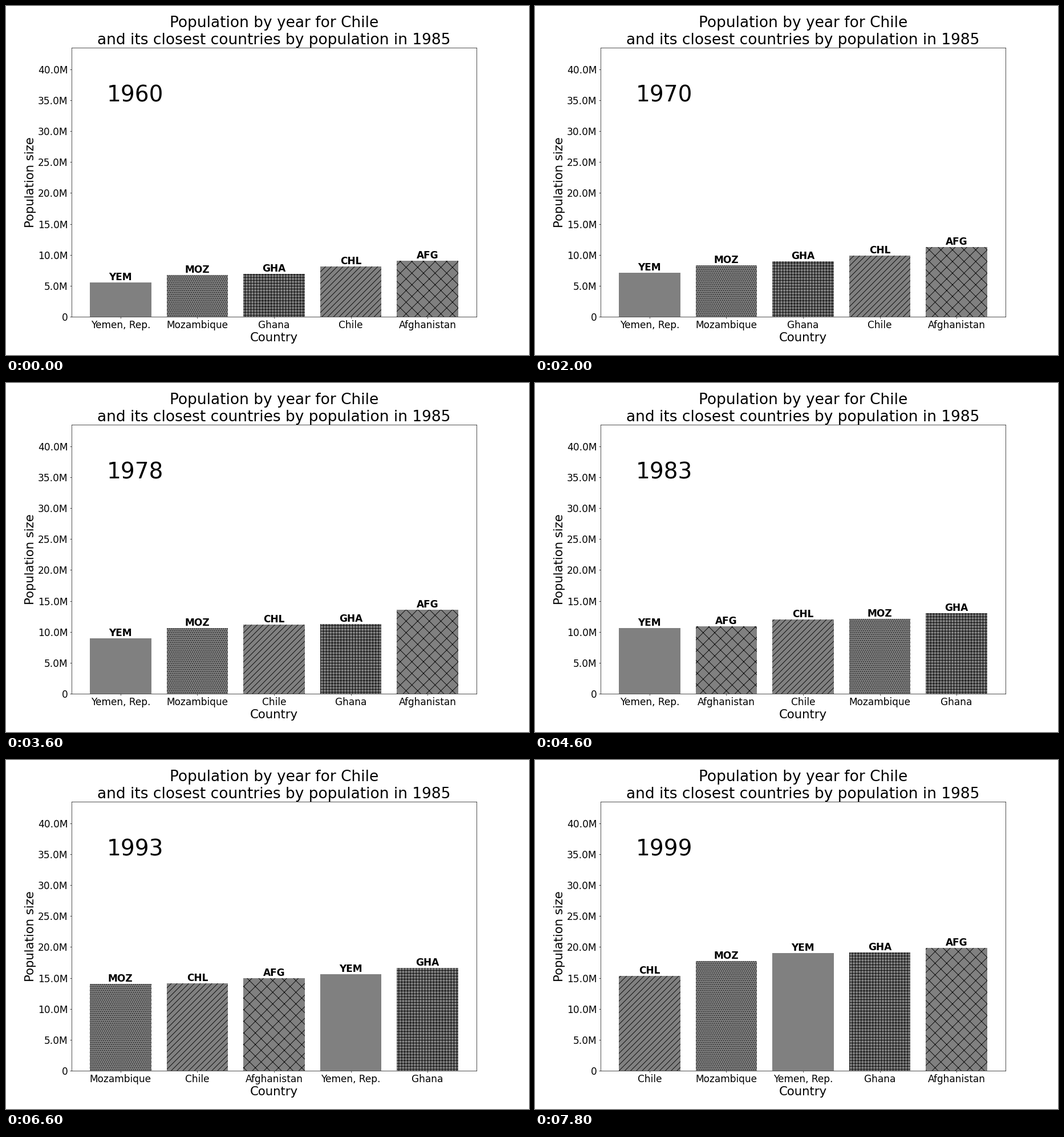
Animation, 917 px wide and 611 px high, one loop 8000 ms. Source, as a matplotlib script:

```python
import numpy as np
import matplotlib.pyplot as plt
from matplotlib.animation import FuncAnimation
from matplotlib.ticker import FuncFormatter, MultipleLocator

WIDTH, HEIGHT = 917, 611
DPI = WIDTH / 15
START, END = 1960, 1999
YEARS = np.arange(START, END + 1)


def smooth(points):
    """Cubic Hermite curve through {year: millions}, sampled every year."""
    x = np.array(list(points), float)
    y = np.array(list(points.values()), float)
    slope = np.gradient(y, x)
    i = np.clip(np.searchsorted(x, YEARS, side="right") - 1, 0, len(x) - 2)
    h = x[i + 1] - x[i]
    t = (YEARS - x[i]) / h
    return ((1 + 2 * t) * (1 - t) ** 2 * y[i]
            + t * (1 - t) ** 2 * h * slope[i]
            + t ** 2 * (3 - 2 * t) * y[i + 1]
            + t ** 2 * (t - 1) * h * slope[i + 1])


# code: (name, hatch, population in millions)
COUNTRIES = {
    "YEM": ("Yemen, Rep.", None, smooth({
        1960: 5.54, 1966: 6.37, 1973: 7.67, 1978: 8.92, 1983: 10.62,
        1988: 12.82, 1993: 15.57, 1999: 19.03})),
    "MOZ": ("Mozambique", "...", smooth({
        1960: 6.75, 1966: 7.57, 1973: 8.98, 1978: 10.62, 1983: 12.06,
        1985: 12.5, 1988: 12.8, 1990: 13.1, 1992: 13.55, 1993: 14.05,
        1994: 14.9, 1996: 16.2, 1999: 17.74})),
    "GHA": ("Ghana", "++", smooth({
        1960: 6.93, 1966: 8.06, 1973: 9.7, 1978: 11.23, 1983: 13.04,
        1988: 14.83, 1993: 16.62, 1999: 19.14})),
    "CHL": ("Chile", "//", smooth({
        1960: 8.13, 1966: 9.22, 1973: 10.34, 1978: 11.18, 1983: 12.02,
        1988: 13.03, 1993: 14.12, 1999: 15.32})),
    "AFG": ("Afghanistan", "x", smooth({
        1960: 9.035, 1966: 10.266, 1970: 11.29, 1973: 12.158, 1976: 13.06,
        1978: 13.611, 1979: 13.656, 1980: 13.169, 1981: 11.938,
        1982: 10.991, 1983: 10.918, 1984: 11.19, 1985: 11.427,
        1987: 11.388, 1989: 11.874, 1991: 12.239, 1992: 13.279,
        1993: 14.943, 1994: 16.251, 1995: 17.066, 1997: 18.452,
        1999: 19.888})),
}


def millions(value, _):
    return f"{value:.1f}M" if value else "0"


fig, ax = plt.subplots(figsize=(WIDTH / DPI, HEIGHT / DPI), dpi=DPI)


def draw(frame):
    ax.clear()
    ranked = sorted(COUNTRIES.items(), key=lambda item: item[1][2][frame])
    for x, (code, (name, hatch, pop)) in enumerate(ranked):
        ax.bar(x, pop[frame], color="gray", hatch=hatch)
        ax.text(x, pop[frame], code, size=20, weight="bold",
                ha="center", va="bottom")
    ax.set_xlim(-0.64, 4.64)
    ax.set_ylim(0, 43.5)
    ax.set_xticks(range(5), [info[0] for _, info in ranked])
    ax.yaxis.set_major_locator(MultipleLocator(5))
    ax.yaxis.set_major_formatter(FuncFormatter(millions))
    ax.tick_params(labelsize=20)
    ax.set_xlabel("Country", size=25)
    ax.set_ylabel("Population size", size=25)
    ax.set_title("Population by year for Chile\n"
                 "and its closest countries by population in 1985", size=31)
    ax.text(0.088, 0.8, str(START + frame), size=46, transform=ax.transAxes)
    return []


anim = FuncAnimation(fig, draw, frames=len(YEARS), init_func=lambda: [],
                     interval=200, repeat=True, repeat_delay=0)
plt.show()
```
